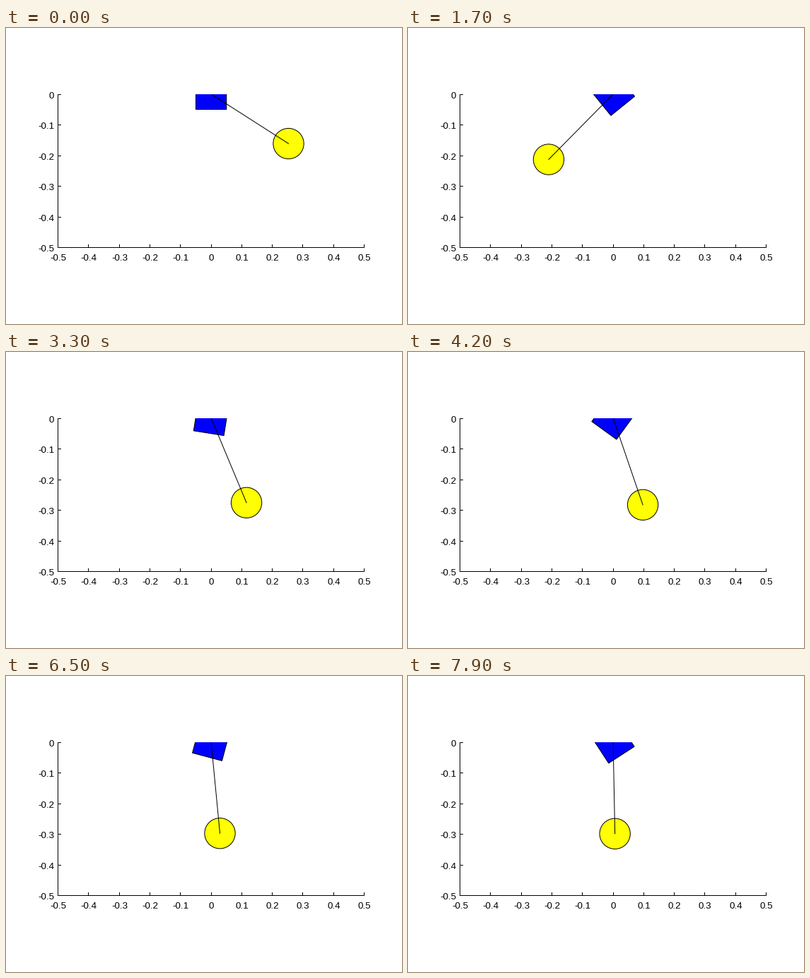
These frames come from a looping animation (560 by 420 pixels, 8 s). A matplotlib script:

```python
import numpy as np
import matplotlib.pyplot as plt
from matplotlib.animation import FuncAnimation
from matplotlib.patches import Circle, Polygon, Rectangle

W, H, DPI = 560, 420, 100
FRAMES, INTERVAL = 80, 100
PX = 72 / DPI                      # one pixel in points
OX, OY, SCALE = 290.1, 93.8, 433.4  # pivot and pixels per unit

ROD, RADIUS, HALF = 0.3, 0.05, 0.05
GRAVITY, DAMPING = 9.81, 1.65
DT, SUB = 1 / 30, 10
REST_POSE, RELEASE = 1.0, 1.51
SPIN = np.radians(-3)


def accel(s):
    return np.array([s[1], -GRAVITY / ROD * np.sin(s[0]) - DAMPING * s[1]])


def swing():
    """Pendulum angle per frame: a resting pose, then a damped release."""
    s, h = np.array([RELEASE, 0.0]), DT / SUB
    angles = [REST_POSE, RELEASE]
    while len(angles) < FRAMES:
        for _ in range(SUB):
            k1 = accel(s)
            k2 = accel(s + h / 2 * k1)
            k3 = accel(s + h / 2 * k2)
            k4 = accel(s + h * k3)
            s = s + h / 6 * (k1 + 2 * k2 + 2 * k3 + k4)
        angles.append(s[0])
    return angles


def to_px(x, y):
    return OX + SCALE * x, OY - SCALE * y


plt.rcParams["font.family"] = "Liberation Sans"
fig = plt.figure(figsize=(W / DPI, H / DPI), dpi=DPI, facecolor="white")
ax = fig.add_axes([0, 0, 1, 1])
ax.set_xlim(0, W)
ax.set_ylim(H, 0)
ax.axis("off")


def stroke(xs, ys, **kw):
    return ax.plot(xs, ys, color="black", lw=PX, snap=False, **kw)[0]


def label(x, y, value, ha):
    text = "0" if abs(value) < 0.01 else f"{value:.1f}"
    ax.text(x, y, text, ha=ha, va="baseline", fontsize=13.33 * PX, color="black")


# axes with inward ticks
LEFT, RIGHT, TOP, BOTTOM = 73.5, 506.5, 94.5, 311.5
stroke([LEFT, LEFT], [TOP, BOTTOM], solid_capstyle="projecting", zorder=5)
stroke([LEFT, RIGHT], [BOTTOM, BOTTOM], solid_capstyle="projecting", zorder=5)
for i in range(11):
    x = np.floor(LEFT + (RIGHT - LEFT) * i / 10) + 0.5
    stroke([x, x], [BOTTOM, BOTTOM - 4.5], solid_capstyle="butt", zorder=5)
    label(x, 330.5, -0.5 + i / 10, "center")
for j in range(6):
    y = np.floor(TOP + (BOTTOM - TOP) * j / 5) + 0.5
    stroke([LEFT, LEFT + 4.5], [y, y], solid_capstyle="butt", zorder=5)
    label(68, y + 5.8, -j / 10, "right")

edge = dict(ec="black", lw=PX, snap=False)
block = ax.add_patch(Polygon(np.zeros((4, 2)), fc="#0000ff", joinstyle="miter",
                             zorder=2, **edge))
ball = ax.add_patch(Circle((0, 0), RADIUS * SCALE, fc="#ffff00", zorder=3, **edge))
rod = stroke([], [], zorder=4)

window = Rectangle((73, 94), 434, 218, transform=ax.transData)
for part in (block, ball, rod):
    part.set_clip_path(window)

ANGLES = swing()
CORNERS = np.pi / 4 + np.pi / 2 * np.arange(4)


def draw(n):
    th = ANGLES[n]
    bx, by = to_px(ROD * np.sin(th), -ROD * np.cos(th))
    ball.center = bx, by
    rod.set_data([OX, bx], [OY, by])
    turn, r = CORNERS + SPIN * n, HALF * np.sqrt(2)
    block.set_xy(np.column_stack(to_px(r * np.cos(turn), r * np.sin(turn))))
    return block, ball, rod


anim = FuncAnimation(fig, draw, frames=FRAMES, interval=INTERVAL,
                     repeat=True, repeat_delay=0, blit=False)
plt.show()
```
